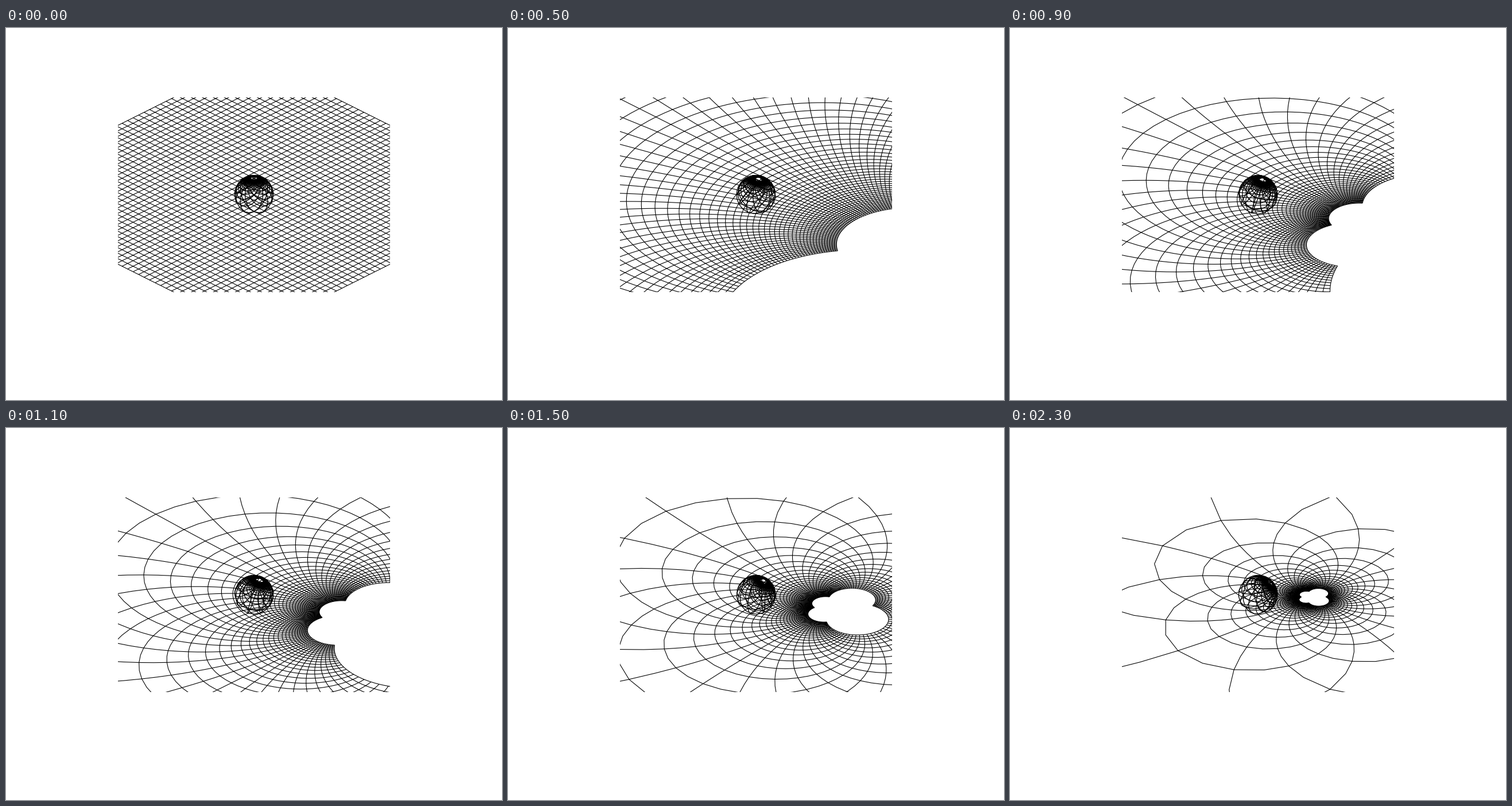
Recreate the animation shown at these times as a matplotlib script. Size 864 px wide and 648 px high, loop 2.4 s.

```python
import numpy as np
import matplotlib.pyplot as plt
from matplotlib.animation import FuncAnimation
from matplotlib.collections import LineCollection

W, H, DPI = 864, 648, 72
FRAMES, INTERVAL = 24, 100
MAX_TURN = np.radians(40)
TILT = np.radians(30)          # camera elevation
AZIMUTH = np.exp(-1j * np.pi / 4)

# Square lattice as complex polylines: 51 lines each way, two segments per cell
levels = np.linspace(-10, 10, 51)[:, None]
steps = np.linspace(-10, 10, 101)[None, :]
lattice = np.vstack([levels + 1j * steps, steps + 1j * levels])


def turn(p, a):
    """Moebius map of a sphere rotation Rz(a) Ry(a) Rz(a)."""
    c, s = np.cos(a / 2), np.sin(a / 2)
    q = p * np.exp(1j * a)
    return np.exp(1j * a) * (q * c - s) / (q * s + c)


def project(z, height=0.0):
    """Orthographic view of plane position z at the given height."""
    v = z * AZIMUTH
    y = np.sin(TILT) * v.imag + np.cos(TILT) * height
    return np.stack([v.real, y], axis=-1)


def to_sphere(z):
    """Inverse stereographic projection onto the unit sphere."""
    r2 = np.abs(z) ** 2
    return 2 * z / (r2 + 1), (r2 - 1) / (r2 + 1)


fig = plt.figure(figsize=(W / DPI, H / DPI), dpi=DPI, facecolor="white")
box_w = 474
box_h = box_w * 10 / 14
cx, cy = 432, H - 290.5
ax = fig.add_axes([(cx - box_w / 2) / W, (cy - box_h / 2) / H, box_w / W, box_h / H])
ax.set_xlim(-7, 7)
ax.set_ylim(-5, 5)
ax.axis("off")

plane = LineCollection([], colors="black", linewidths=1.1)
sphere = LineCollection([], colors="black", linewidths=1.3)
ax.add_collection(plane, autolim=False)
ax.add_collection(sphere, autolim=False)


def draw(i):
    w = turn(lattice, MAX_TURN * i / (FRAMES - 1))
    plane.set_segments(project(w))
    sphere.set_segments(project(*to_sphere(w)))
    return plane, sphere


anim = FuncAnimation(fig, draw, frames=FRAMES, interval=INTERVAL, repeat=True, repeat_delay=0)
plt.show()
```
